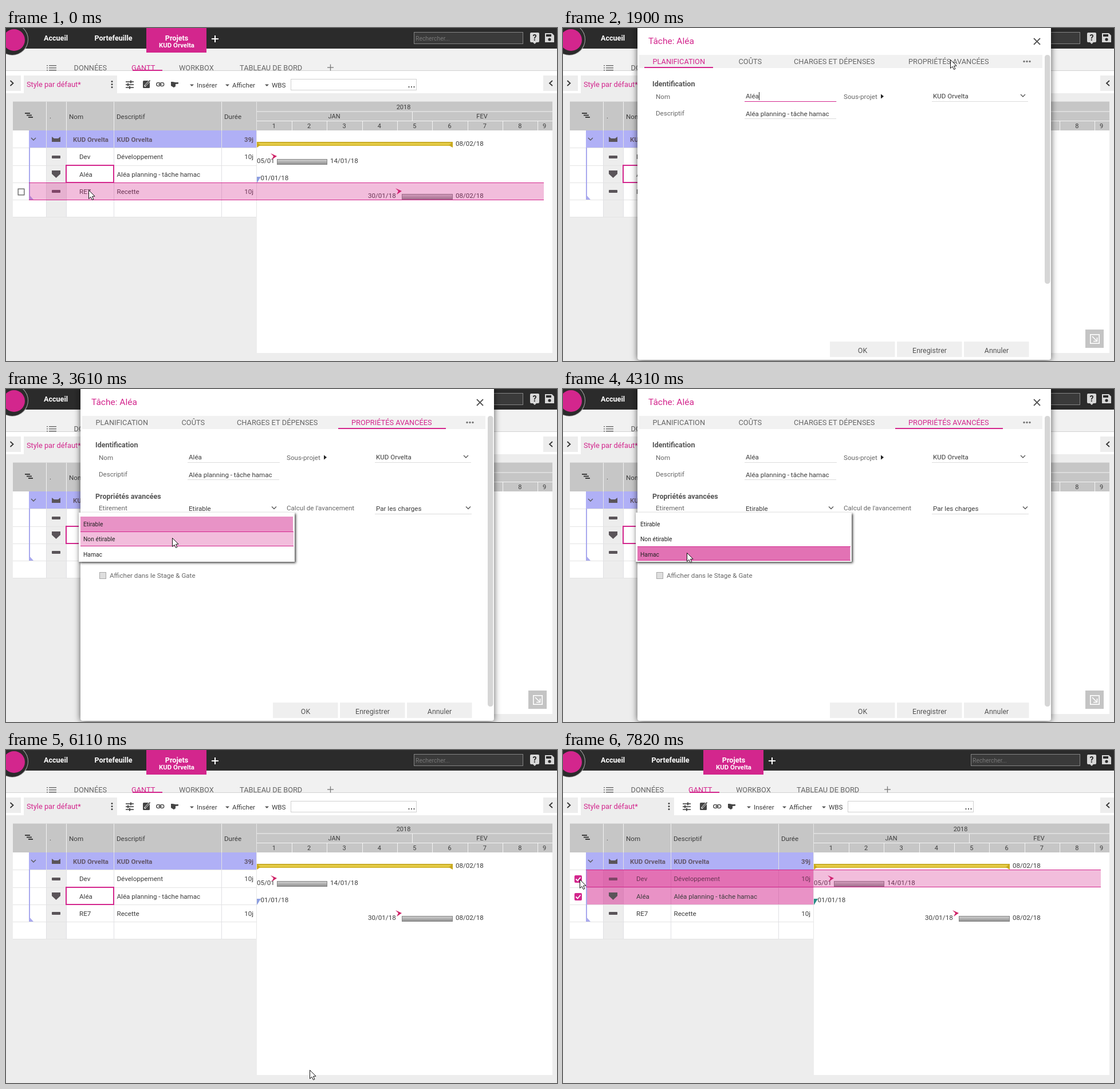
Write an HTML page with a canvas that moves like this. It is 962x582 px and loops after 7990 ms.

```html
<!DOCTYPE html>
<html lang="fr">
<head>
<meta charset="utf-8">
<title>Planning</title>
<style>
html, body { margin: 0; width: 100%; height: 100%; overflow: hidden; background: #ededed; }
canvas { display: block; }
</style>
</head>
<body>
<canvas id="stage" width="962" height="582"></canvas>
<script>
const LOOP = 7990;
const PROJECT = 'KUD Orvelta';
const PINK = '#d3268d', INK = '#3c3c3c', GREY = '#666', PAGE = '#ededed', HEAD = '#c6c6c6';
const c = document.getElementById('stage').getContext('2d');

// ---- helpers ----
function rect(x, y, w, h, fill) {
  c.fillStyle = fill;
  c.fillRect(x, y, w, h);
}

function frame(x, y, w, h, color, lw = 1) {
  c.strokeStyle = color;
  c.lineWidth = lw;
  c.strokeRect(x + lw / 2, y + lw / 2, w - lw, h - lw);
}

function trace(points) {
  c.beginPath();
  for (let i = 0; i < points.length; i += 2) c.lineTo(points[i], points[i + 1]);
}

function poly(points, fill) {
  trace(points);
  c.closePath();
  c.fillStyle = fill;
  c.fill();
}

function line(points, color, lw = 1) {
  trace(points);
  c.strokeStyle = color;
  c.lineWidth = lw;
  c.stroke();
}

function dot(x, y, r, fill) {
  c.beginPath();
  c.arc(x, y, r, 0, 7);
  c.fillStyle = fill;
  c.fill();
}

function round(x, y, w, h, r, fill) {
  c.beginPath();
  c.roundRect(x, y, w, h, r);
  c.fillStyle = fill;
  c.fill();
}

function text(s, x, y, { size = 11.6, color = INK, align = 'left', weight = 400 } = {}) {
  c.font = `${weight} ${size}px Roboto, "Open Sans", sans-serif`;
  c.fillStyle = color;
  c.textAlign = align;
  c.textBaseline = 'alphabetic';
  c.fillText(s, x, Math.round(y + size * 0.36));
}

function shadowed(blur, dx, dy, color, draw) {
  c.save();
  c.shadowColor = color;
  c.shadowBlur = blur;
  c.shadowOffsetX = dx;
  c.shadowOffsetY = dy;
  draw();
  c.restore();
}

const chevronDown = (x, y) => line([x - 4, y - 2, x, y + 2, x + 4, y - 2], '#555', 1.3);
const plus = (x, y, r, color, lw) => {
  line([x - r, y, x + r, y], color, lw);
  line([x, y - r, x, y + r], color, lw);
};

// ---- cursor: start, end, steps, x, y ----
const START = [144, 283];
const MOVES = [
  [90, 260, 3, 144, 253],
  [410, 410, 1, 143, 253],
  [1200, 1200, 1, 157, 285],
  [1530, 1830, 5, 676, 55],
  [1990, 2290, 5, 474, 204],
  [2370, 2370, 1, 470, 208],
  [2910, 3140, 4, 382, 226],
  [3220, 3610, 6, 290, 260],
  [3680, 3910, 4, 215, 285],
  [4310, 4310, 1, 216, 286],
  [4780, 5410, 9, 539, 561],
  [5560, 5560, 1, 530, 562],
  [5710, 5880, 3, 530, 559],
  [6190, 6810, 9, 27, 252],
  [7120, 7510, 6, 28, 226],
  [7670, 7670, 1, 29, 226]
];

function cursorAt(t) {
  let [x, y] = START;
  for (const [from, to, steps, tx, ty] of MOVES) {
    if (t < from) break;
    const k = t >= to ? 1 : (1 + Math.floor((t - from) / (to - from) * (steps - 1))) / steps;
    const e = k * k * (3 - 2 * k);
    x += (tx - x) * e;
    y += (ty - y) * e;
  }
  return [Math.round(x), Math.round(y)];
}

function drawCursor([x, y]) {
  c.save();
  c.translate(x + 0.5, y + 0.5);
  const p = [0, 0, 0, 15, 3.4, 11.8, 6, 17, 8.4, 16, 6, 10.8, 10.6, 10.6];
  poly(p, '#fff');
  trace(p);
  c.closePath();
  c.strokeStyle = '#111';
  c.lineWidth = 1;
  c.stroke();
  c.restore();
}

// ---- page ----
function topBar() {
  rect(0, 0, 962, 582, PAGE);
  rect(0, 36, 962, 39, '#f1f1f1');
  rect(0, 75, 962, 39, '#fff');
  rect(0, 74, 962, 1, '#d2d2d2');
  rect(0, 0, 962, 36, '#2b2b2b');
  dot(11, 20, 28, '#a8a8a8');
  dot(11, 20, 27, '#2b2b2b');
  dot(14, 21, 19, PINK);

  const bold = { size: 12.6, color: '#fff', weight: 700, align: 'center' };
  text('Accueil', 87, 17.5, bold);
  text('Portefeuille', 187.5, 17.5, bold);
  rect(245, 0, 105, 43, PINK);
  text('Projets', 298, 17, bold);
  text(PROJECT, 298, 30, { ...bold, size: 11.4 });
  plus(365, 19, 6, '#fff', 2);

  rect(712, 7, 191, 21, '#3a3a3a');
  frame(712, 7, 191, 21, '#858585');
  text('Rechercher...', 715, 18, { size: 10.4, color: '#777' });
  round(915, 8, 16, 17, 2, '#d8d8d8');
  poly([920, 25, 926, 25, 923, 28], '#d8d8d8');
  text('?', 923, 17, { size: 14, color: '#2b2b2b', weight: 700, align: 'center' });
  poly([941, 9, 953, 9, 957, 13, 957, 25, 941, 25], '#d8d8d8');
  rect(943, 11, 9, 4, '#2b2b2b');
  dot(949, 20, 2.6, '#2b2b2b');
}

function tabs() {
  for (const y of [66, 70, 74]) {
    rect(71, y - 1, 2, 1.4, GREY);
    rect(75, y - 1, 13, 1.4, GREY);
  }
  const tab = { size: 12.8, color: GREY };
  text('DONNÉES', 118.5, 69, tab);
  text('GANTT', 219, 69, { ...tab, color: PINK });
  text('WORKBOX', 302, 69, tab);
  text('TABLEAU DE BORD', 408, 69, tab);
  plus(566.5, 69, 5.5, '#777', 1.3);
  rect(221, 73, 52, 2, PINK);
}

function toolbar() {
  rect(0, 83, 26, 27, PAGE);
  line([7.5, 92, 12.5, 96.5, 7.5, 101], '#333', 1.8);
  rect(938, 83, 24, 27, PAGE);
  line([954, 92, 949, 96.5, 954, 101], '#333', 1.8);
  rect(31, 83, 163, 31, PAGE);
  text('Style par défaut*', 36, 98.5, { size: 12.8, color: PINK });
  for (const y of [93.5, 98.5, 103.5]) dot(185, y, 1.5, '#444');

  // sliders
  [[94, 217], [99, 212], [104, 215]].forEach(([y, k]) => {
    rect(209, y - 0.8, 14, 1.6, '#444');
    rect(k, y - 2.5, 2, 5, '#444');
  });
  // edit
  round(239, 92, 12, 13, 1.5, '#444');
  line([242, 102, 251, 92], '#fff', 3);
  line([243, 101, 251.5, 91.5], '#444', 1.8);
  // link
  c.strokeStyle = '#555';
  c.lineWidth = 1.5;
  for (const x of [262.7, 269.2]) {
    c.beginPath();
    c.roundRect(x, 95.5, 6.5, 6, 3);
    c.stroke();
  }
  line([266, 98.5, 272, 98.5], '#555', 1.5);
  // hand
  poly([288, 94, 291, 94, 296, 95, 301, 95, 301, 97.5, 296, 98, 296, 102, 293, 104, 288, 101], '#444');

  for (const [s, x] of [['Insérer', 333], ['Afficher', 395], ['WBS', 464]]) {
    poly([x - 12, 98.5, x - 5, 98.5, x - 8.5, 102], '#555');
    text(s, x, 99.5);
  }
  frame(497, 89, 220, 20, '#d0d0d0');
  for (const x of [703.5, 708, 712.5]) dot(x, 103, 1.1, '#333');
}

const ROW_Y = [179, 209, 240, 270, 300];
const ROWS = [
  [PROJECT, PROJECT, '39j'],
  ['Dev', 'Développement', '10j'],
  ['Aléa', 'Aléa planning - tâche hamac', ''],
  ['RE7', 'Recette', '10j']
];

function grid(selected) {
  rect(12, 129, 425, 50, HEAD);
  rect(12, 179, 425, 151, '#fff');
  rect(70, 209, 35, 121, '#ededed');
  rect(40, 179, 397, 30, '#b0b0f6');
  for (const y of [209, 240, 270, 300, 330]) rect(12, y, 425, 1, '#e4e4e4');
  for (const x of [70, 105, 188, 376]) {
    rect(x, 129, 1, 50, '#f2f2f2');
    rect(x, 179, 1, 151, '#e0e0e4');
  }
  rect(12, 128, 942, 1, '#dcdcdc');

  rect(33, 148, 9, 2, INK);
  rect(36, 151.5, 9, 2, INK);
  rect(39, 155, 8, 2, INK);
  text('.', 76, 154);
  text('Nom', 110, 154.5);
  text('Descriptif', 193, 154.5);
  text('Durée', 381, 154.5);

  selected.forEach(r => {
    c.globalAlpha = 0.5;
    rect(40, ROW_Y[r], 397, 30, PINK);
    c.globalAlpha = 1;
  });

  chevronDown(48, 194);
  rect(40, 209, 2, 91, '#a9a9ee');
  poly([40, 291, 48, 300, 40, 300], '#a9a9ee');

  const icon = '#5a5459';
  poly([80, 190, 84, 193, 91, 193, 95, 190, 95, 199, 80, 199], icon);
  round(80, 223, 15, 5, 1, icon);
  poly([80, 249, 95, 249, 95, 255, 87.5, 262, 80, 255], icon);
  round(80, 283, 15, 5, 1, icon);

  ROWS.forEach(([name, desc, days], i) => {
    const y = ROW_Y[i] + 15.5;
    const st = i ? {} : { size: 11.4, weight: 700, color: '#63576a' };
    text(name, i ? 128 : 117, y, st);
    text(desc, 193.5, y, st);
    text(days, 432, y, { ...st, align: 'right' });
  });
}

function bar(x, y, w) {
  const g = c.createLinearGradient(0, y, 0, y + 10);
  g.addColorStop(0, '#d2d2d2');
  g.addColorStop(0.45, '#b5b5b5');
  g.addColorStop(1, '#888');
  rect(x, y, w, 10, g);
  frame(x, y, w, 10, '#858585');
  poly([x - 11, y - 10, x, y - 5, x - 9, y + 1, x - 6, y - 5], '#cf2367');
}

function gantt(selected) {
  rect(438, 129, 516, 439, '#fff');
  rect(438, 129, 516, 50, HEAD);
  rect(438, 145.5, 516, 1, '#f4f4f4');
  rect(438, 162, 516, 1, '#f4f4f4');
  rect(437, 129, 1, 201, '#e6e6e6');
  rect(709, 146, 1, 16, '#f4f4f4');
  const mid = { size: 11, align: 'center' };
  text('2018', 694, 138, mid);
  text('JAN', 573, 154.5, mid);
  text('FEV', 831, 154.5, mid);
  for (let i = 1; i < 10; i++) {
    const x = 437.5 + 61.35 * i;
    if (i < 9) rect(Math.round(x), 163, 1, 16, '#f4f4f4');
    text(String(i), i < 9 ? x - 31 : 940, 171.5, mid);
  }

  const g = c.createLinearGradient(0, 199, 0, 207);
  g.addColorStop(0, '#b89a14');
  g.addColorStop(0.4, '#edd550');
  g.addColorStop(1, '#c4a51c');
  rect(438, 199, 342, 7, g);
  poly([438, 199, 444, 205, 438, 209], '#c9a91f');
  poly([780, 199, 773, 205, 780, 209], '#c9a91f');
  text('08/02/18', 785, 202);
  text('05/01', 438, 232);
  bar(473, 229, 88);
  text('14/01/18', 566, 232);
  poly([438, 260, 445, 260, 438, 271], selected.includes(2) ? '#268a85' : '#8c9ee0');
  text('01/01/18', 444.5, 262);
  text('30/01/18', 632, 292.5);
  bar(691, 290, 89);
  text('08/02/18', 785, 292.5);
}

function checkbox(r, on) {
  const y = ROW_Y[r] + 10;
  if (on) {
    round(20, y, 13, 13, 2, PINK);
    line([22.5, y + 6.5, 25.5, y + 9.5, 30.5, y + 3.5], '#fff', 1.8);
  } else {
    rect(20, y, 13, 13, '#fff');
    frame(20.5, y + 0.5, 12, 12, '#666', 1.4);
  }
}

function hoverRow(r) {
  const y = ROW_Y[r];
  c.globalAlpha = 0.3;
  rect(40, y, 899, 30, PINK);
  c.globalAlpha = 1;
  rect(40, y, 899, 1, PINK);
  rect(40, y + 30, 899, 1, PINK);
}

function tooltip(alpha) {
  c.globalAlpha = alpha;
  shadowed(3, 0, 0, 'rgba(0,0,0,.2)', () => rect(143, 279, 46, 35, '#fff'));
  frame(143, 279, 46, 35, PINK);
  text('Aléa', 166, 297, { align: 'center' });
  c.globalAlpha = 1;
}

// ---- dialog ----
function field(value, x, y, w, chevronX) {
  text(value, x + 2, y);
  rect(x, Math.round(y) + 9, w, 1, '#dcdcdc');
  if (chevronX) chevronDown(chevronX, y - 1);
}

function dialog(t) {
  const advanced = t >= 1910;
  const focus = t < 2520 || (t >= 4780 && t < 5710);
  const caret = t < 2370 || (t >= 4780 && t < 5560);
  const label = { color: GREY };
  const title = { size: 12.5, weight: 700, color: '#555' };

  rect(912, 527, 32, 32, '#c4c4c4');
  frame(920, 535, 17, 17, '#fff', 1.6);
  line([924, 539, 932, 547], '#fff', 1.6);
  line([932.5, 541, 932.5, 547.5, 926, 547.5], '#fff', 1.6);

  shadowed(12, 0, 1, 'rgba(0,0,0,.65)', () => round(130, -6, 722, 586, 4, '#fff'));
  text('Tâche: Aléa', 149, 22.5, { size: 15.5, color: PINK });
  line([822, 18, 833, 29], '#555', 1.8);
  line([833, 18, 822, 29], '#555', 1.8);

  rect(133, 47, 704, 23, '#f1f1f1');
  const tab = (s, x, on) => text(s, x, 58, { size: 12.8, color: on ? PINK : GREY });
  tab('PLANIFICATION', 156.5, !advanced);
  tab('COÛTS', 306.5);
  tab('CHARGES ET DÉPENSES', 403);
  tab('PROPRIÉTÉS AVANCÉES', 603, advanced);
  if (advanced) rect(580, 68, 188, 2, PINK);
  else rect(142, 68, 120, 2, PINK);
  for (const x of [805, 810, 815]) dot(x, 58.5, 1.7, '#777');
  round(841, 47, 9.5, advanced ? 508 : 400, 4.5, '#d6d6d6');

  text('Identification', 156, 97.5, title);
  text('Nom', 162, 119.5, label);
  field('Aléa', 317, 119, 161);
  if (focus) rect(317, 128, 160, 1, PINK);
  if (caret) rect(342, 112, 1, 14, '#222');
  text('Sous-projet', 490, 119.5, label);
  poly([555, 115.5, 560, 119.5, 555, 123.5], '#222');
  field(PROJECT, 644, 119, 168, 803);
  text('Descriptif', 162, 149, label);
  field('Aléa planning - tâche hamac', 317, 149.4, 160);

  if (advanced) {
    text('Propriétés avancées', 156, 187.5, title);
    text('Etirement', 162, 208, label);
    field(t < 4780 ? 'Etirable' : 'Hamac', 317, 208.5, 158, 468);
    text("Calcul de l'avancement", 490, 208, label);
    field('Par les charges', 644, 208.5, 169, 807);
    rect(163, 320, 12, 12, '#dedede');
    frame(163, 320, 12, 12, '#a8a8a8');
    text('Afficher dans le Stage & Gate', 181, 326, label);
  }

  const pressed = t >= 5710;
  [['OK', 466], ['Enregistrer', 583], ['Annuler', 700]].forEach(([s, x], i) => {
    rect(x, 548, 113.5, 27, pressed && !i ? '#dcdcdc' : '#efefef');
    text(s, x + 57, 563.5, { size: 12.4, color: '#555', align: 'center' });
  });
}

function dropdown(t, [, y]) {
  const items = [['Etirable', 223, 26], ['Non étirable', 249, 26], ['Hamac', 275, 25]];
  const chosen = t < 4080 ? 0 : 2;
  shadowed(4, 2, 2, 'rgba(0,0,0,.75)', () => rect(127, 216, 377, 86, '#fff'));
  items.forEach(([s, top, h], i) => {
    const hover = i > 0 && y >= top && y < top + h;
    if (i === chosen) rect(130, top, 371, h, '#e893c6');
    if (hover) {
      c.globalAlpha = 0.3;
      rect(130, top, 372, h, PINK);
      c.globalAlpha = 1;
      rect(130, top, 372, 1, PINK);
      rect(130, top + h - 1, 372, 1, PINK);
    }
    text(s, 135, 235.8 + 26.5 * i, { size: 10.3, color: '#222' });
  });
}

// ---- timeline ----
function hoveredRow(t, [x, y]) {
  if (t >= 1200 && t < 1280) return 2; // page is busy opening the dialog
  if (x < 12 || x > 939) return 0;
  return [1, 2, 3].find(r => y >= ROW_Y[r] && y < ROW_Y[r + 1]) || 0;
}

function draw(t) {
  const pos = cursorAt(t);
  const open = t >= 1280 && t < 6030;
  const selected = [];
  if (t >= 6890) selected.push(2);
  if (t >= 7820) selected.push(1);

  topBar();
  tabs();
  toolbar();
  grid(selected);
  gantt(selected);

  const hover = open ? 0 : hoveredRow(t, pos);
  if (hover) {
    hoverRow(hover);
    if (!selected.includes(hover)) checkbox(hover, false);
  }
  selected.forEach(r => checkbox(r, true));
  if (!selected.length) frame(104, 239, 85, 32, PINK, 2);
  if (t >= 820 && t < 1280) tooltip(Math.min(4, 1 + Math.floor((t - 820) / 76)) / 4);

  if (open) {
    dialog(t);
    if (t >= 2830 && t < 4780) dropdown(t, pos);
  }
  drawCursor(pos);
}

const origin = performance.now();
function tick() {
  draw((performance.now() - origin) % LOOP);
  requestAnimationFrame(tick);
}
tick();
</script>
</body>
</html>
```
